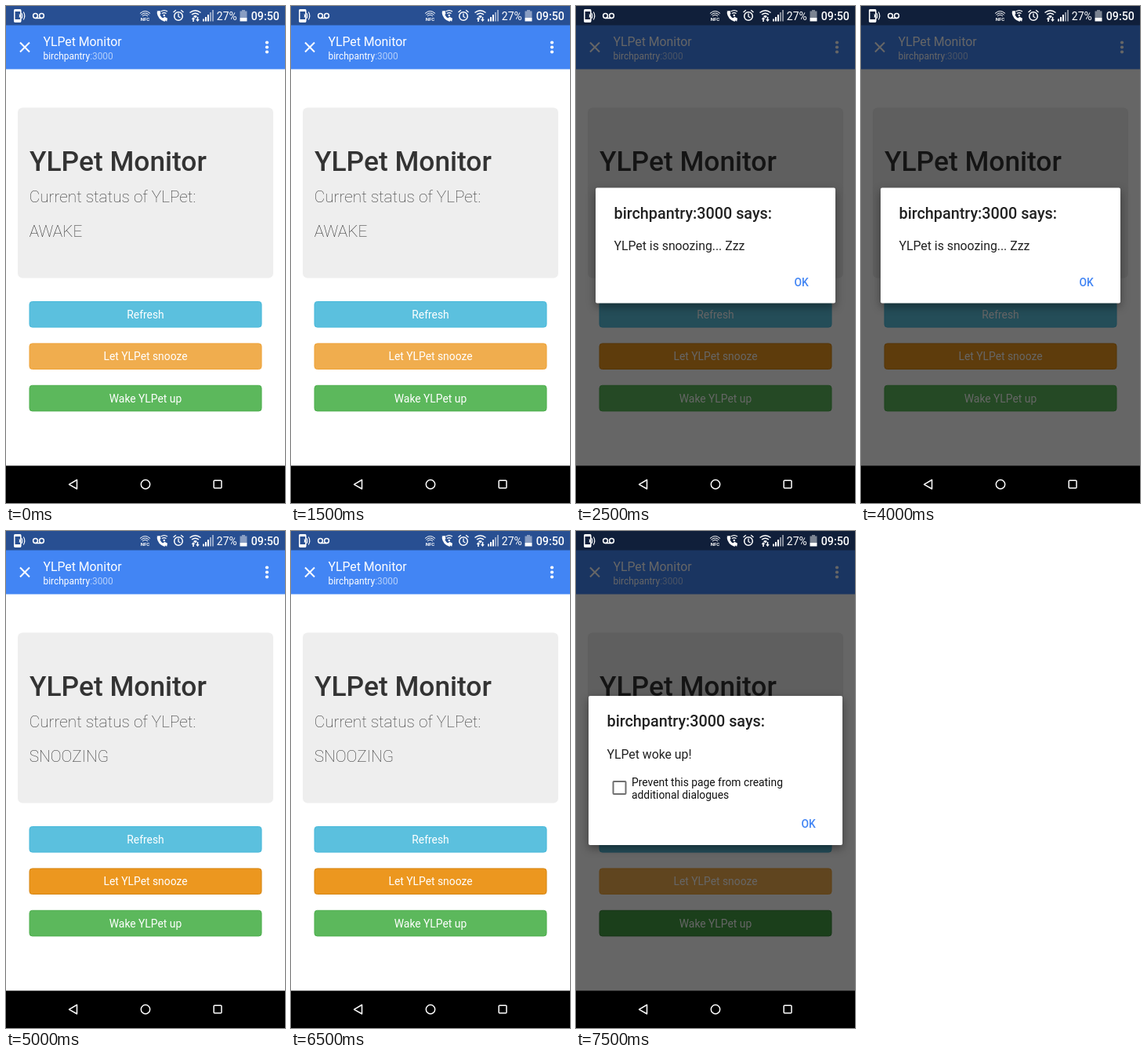
Animation of 356x633 px, one loop 10000 ms. Source, as an HTML page:

```html
<!DOCTYPE html>
<html lang="en">
<head>
<meta charset="utf-8">
<title>Monitor</title>
<style>
  html, body { margin: 0; width: 100%; height: 100%; overflow: hidden; background: #fff; }
  svg { display: block; width: 100vw; height: 100vh; font-family: Roboto, sans-serif; }
  .line { fill: none; stroke: #fff; stroke-width: 1.5; }
  .thin { font-size: 20.8px; font-weight: 100; fill: #333; }
  .label { font-size: 13.85px; fill: #fff; text-anchor: middle; }
  .dialog { fill: #212121; font-size: 15.8px; }
  .dialog .box { fill: #fff; filter: drop-shadow(0 4px 6px #0006); }
  .dialog .head { font-size: 19.8px; font-weight: 500; }
  .dialog .small { font-size: 13.85px; fill: #111; }
  .dialog .ok { font-size: 13.85px; font-weight: 500; fill: #4285f4; }
</style>
</head>
<body>
<svg viewBox="0 0 356 633">
  <rect width="356" height="633" fill="#fff"/>
  <rect width="356" height="25" fill="#284f92"/>

  <g fill="#fff">
    <rect y="24.5" width="356" height="56" fill="#4285f4"/>
    <path class="line" style="stroke-width:2" d="M18 46.5l12 12m0-12l-12 12"/>
    <text x="47.5" y="50.5" font-size="15.8">YLPet Monitor</text>
    <text x="47.5" y="67.5" font-size="11.9">birchpantry<tspan fill-opacity=".6">:3000</tspan></text>
    <circle cx="333" cy="46.5" r="2.1"/>
    <circle cx="333" cy="52.5" r="2.1"/>
    <circle cx="333" cy="58.5" r="2.1"/>
  </g>

  <rect x="15" y="129.5" width="326" height="217" rx="6" fill="#eee"/>
  <text x="30" y="210" font-size="35.3" font-weight="500" fill="#333">YLPet Monitor</text>
  <text class="thin" x="29.7" y="249.5">Current status of YLPet:</text>
  <text class="thin" x="29.7" y="294" id="status"></text>
  <g id="buttons"></g>

  <rect id="dim" width="356" height="586" fill="#000" fill-opacity=".6"/>

  <g class="dialog" id="snoozeDialog">
    <rect class="box" x="25" y="231.5" width="306" height="147" rx="2"/>
    <text class="head" x="48.5" y="270.5">birchpantry:3000 says:</text>
    <text x="48.5" y="311">YLPet is snoozing... Zzz</text>
    <text class="ok" x="278.5" y="356.5">OK</text>
  </g>
  <g class="dialog" id="wakeDialog">
    <rect class="box" x="16" y="210" width="324" height="190" rx="2"/>
    <text class="head" x="39.5" y="249">birchpantry:3000 says:</text>
    <text x="39.5" y="289.5">YLPet woke up!</text>
    <rect x="47.5" y="319" width="16" height="16" rx="1" fill="none" stroke="#707070" stroke-width="2"/>
    <text class="small" x="71" y="325">Prevent this page from creating</text>
    <text class="small" x="71" y="340.5">additional dialogues</text>
    <text class="ok" x="287.5" y="377.5">OK</text>
  </g>

  <!-- status bar icons -->
  <g fill="#fff">
    <rect class="line" x="10.8" y="4.7" width="8" height="15.6" rx="1.2"/>
    <path d="M10.5 4.5h8.6v2.5h-8.6zm0 12.5h8.6v3.5h-8.6z"/>
    <path class="line" style="stroke-width:1.1" d="M17 10.5q1.3 2 0 4M19.8 9q2.2 3.5 0 7M22.3 7.5q3 5 0 10"/>
    <path class="line" d="M37.5 15.5h8"/>
    <circle class="line" cx="37.5" cy="12.5" r="2.9"/>
    <circle class="line" cx="45.5" cy="12.5" r="2.9"/>

    <path class="line" style="stroke-width:1" d="M171 9.5q6.5-6 13 0M172.5 11.3q5-4.6 10 0M174 13q3.5-3.2 7 0"/>
    <text x="177.5" y="19.3" font-size="6" font-weight="700" text-anchor="middle">NFC</text>
    <path class="line" style="stroke-width:3" d="M194 8q1 8 9 10.500"/>
    <path d="M192.500 6.500l4-.5 1 4-2.500 2zM199.500 16l3-2.200 3.500 2-.8 4z"/>
    <path class="line" style="stroke-width:1.3" d="M197.500 7q4.500-2.800 8.500 0M199 9.500q2.800-1.800 5.500 0"/>
    <circle cx="201.800" cy="12" r="1.200"/>
    <circle class="line" cx="220" cy="13" r="5.300"/>
    <path class="line" style="stroke-width:1.300" d="M220 9.500v4l2.500 1.500M213.500 8l3.300-2.800M226.500 8l-3.300-2.800"/>
    <path class="line" d="M234.500 8.500q7-5.500 14 0M237 11q4.500-3.500 9 0"/>
    <path d="M239 13q2.500-2 5 0l-2.500 2.500z"/>
    <path d="M239 14l2.300 3h-1.500v3h-1.600v-3h-1.500zM244.500 20l-2.300-3h1.500v-3h1.600v3h1.500z"/>
    <path d="M251 16.500h2v3h-2zm3-2.500h2v5.500h-2zm3-3h2v8.500h-2z"/>
    <path fill-opacity=".5" d="M260 8h2v11.500h-2zm3-3h2v14.500h-2z"/>
    <text x="268.800" y="18" font-size="14">27%</text>
    <path fill-opacity=".45" d="M301 5h4v1.500h2.500V15h-9V6.500h2.500z"/>
    <path d="M298.500 15h9v4.500h-9z"/>
    <text x="312.800" y="18" font-size="14.200" font-weight="500">09:50</text>
  </g>

  <rect y="585.500" width="356" height="47.500"/>
  <path class="line" stroke-linejoin="round" d="M90.500 603.500v11.500l-10-5.700z"/>
  <circle class="line" cx="178" cy="609.200" r="5.700"/>
  <rect class="line" x="265.200" y="604.300" width="9.800" height="9.800" rx="1"/>
</svg>
<script>
const $ = id => document.getElementById(id);
const STEP = 2500;

const buttons = [
  { y: 376, text: "Refresh", normal: ["#5bc0de", "#46b8da"] },
  { y: 429.4, text: "Let YLPet snooze", normal: ["#f0ad4e", "#eea236"], pressed: ["#ec971f", "#d58512"] },
  { y: 482.8, text: "Wake YLPet up", normal: ["#5cb85c", "#4cae4c"], pressed: ["#449d44", "#398439"] }
];

const scenes = [
  { status: "AWAKE" },
  { status: "AWAKE", pressed: 1, dialog: "snoozeDialog" },
  { status: "SNOOZING", pressed: 1 },
  { status: "SNOOZING", pressed: 2, dialog: "wakeDialog" }
];

const show = (id, on) => $(id).setAttribute("visibility", on ? "visible" : "hidden");

function drawButton({ y, text, normal, pressed }, isPressed) {
  const [fill, edge] = isPressed ? pressed : normal;
  return `<rect x="30" y="${y + .5}" width="296" height="32.6" rx="3.5" fill="${fill}" stroke="${edge}"/>
    <text class="label" x="178" y="${y + 21.8}">${text}</text>`;
}

function draw(scene) {
  $("status").textContent = scene.status;
  $("buttons").innerHTML = buttons.map((b, i) => drawButton(b, i === scene.pressed)).join("");
  show("dim", scene.dialog);
  for (const id of ["snoozeDialog", "wakeDialog"]) show(id, scene.dialog === id);
}

let current;
function tick() {
  const scene = scenes[Math.floor(performance.now() / STEP) % scenes.length];
  if (scene !== current) draw(current = scene);
  requestAnimationFrame(tick);
}
tick();
</script>
</body>
</html>
```
